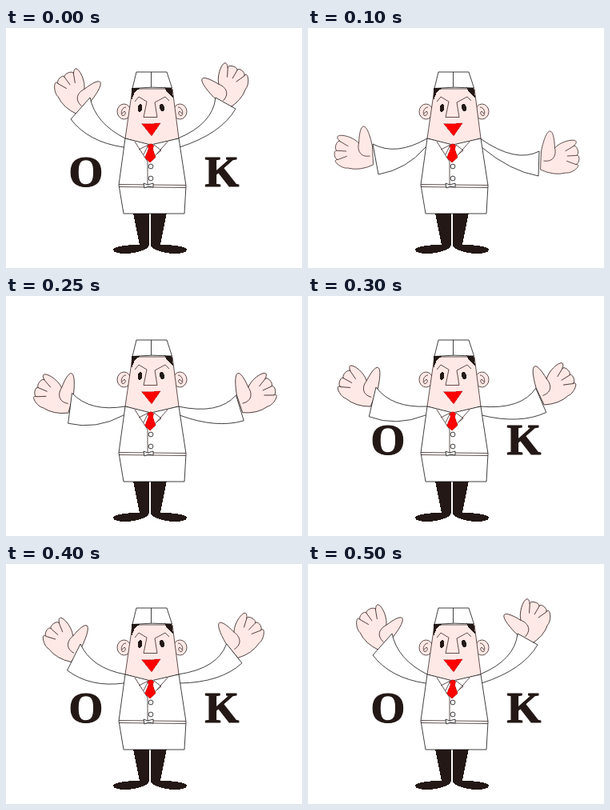
These frames come from a looping animation (370 px wide and 300 px high, 1 s). An HTML page:

```html
<!DOCTYPE html>
<html lang="en">
<head>
<meta charset="utf-8">
<title>OK</title>
<style>
  html, body { margin: 0; width: 100%; height: 100%; overflow: hidden; background: #fff; }
  svg { display: block; width: 370px; height: 300px; }
  text { font: bold 55px "Liberation Serif", "Times New Roman", serif; text-anchor: middle; fill: #231815; stroke: #231815; stroke-width: 1.2; }
  .skin { fill: #ffe9e6; stroke: #3a2424; }
  .cloth { fill: #fff; stroke: #111; }
  .line { fill: none; stroke: #3a2424; }
  .dark { fill: #231815; stroke: none; }
  .red { fill: #f00; stroke: #a01010; stroke-width: .5; }
</style>
</head>
<body>
<svg viewBox="0 0 370 300" stroke-width=".8" stroke-linejoin="round" shape-rendering="crispEdges">
  <defs>
    <path id="shoe" class="dark" d="M159 231H179L178.500 273Q175 278 160 281C149 283 134 282 134 277.500C134 273 150 271 167 271Z"/>
    <g id="ear">
      <ellipse class="skin" cx="147.500" cy="104.500" rx="8.500" ry="9.500"/>
      <path class="line" d="M150 99C145 99 143 106 145 109C148 111 151 106 148 104L145 107"/>
    </g>
  </defs>

  <g id="left"></g>
  <g id="right" transform="matrix(-1 0 0 1 364 0)"></g>

  <use href="#shoe"/>
  <use href="#shoe" transform="matrix(-1 0 0 1 360 0)"/>
  <use href="#ear"/>
  <use href="#ear" transform="matrix(-1 0 0 1 365 0)"/>

  <path class="skin" d="M158 76L149 138L181 147L216 138L208 76Z"/>
  <path class="dark" d="M157 75H168L161 80L157 90ZM198 74H207L209 87L201 80Z"/>
  <path class="cloth" d="M163 55H201L207.500 75Q182 73 158 75.500ZM181.500 55V74"/>
  <path class="line" d="M161 92L166 86L176 92L172 111.500H189L186 93L199 86L204 91"/>
  <ellipse class="dark" cx="167.500" cy="100" rx="2.700" ry="4.800" transform="rotate(8 167.500 100)"/>
  <ellipse class="dark" cx="195" cy="99.500" rx="2.700" ry="4.800" transform="rotate(-8 195 99.500)"/>
  <path class="red" d="M169.500 119.500Q182 120 193 119L182 135Z"/>

  <path class="cloth" d="M149 138L141 196L147 232H223L225 197L216 138L181 146Z"/>
  <path class="line" d="M161 142L177 167V195M202 142L180 167M166 152L178 146L172 158M185 146L194 153L189 157M141 195.500L225 196.500M141 198.500L225 199.500"/>
  <path class="red" d="M177 147L181 144.500L185 147L183.500 151L187 162L180 168L173.500 162L178 151Z"/>
  <circle class="cloth" cx="181" cy="173" r="2.900"/>
  <circle class="cloth" cx="181" cy="188" r="2.900"/>
  <path class="cloth" d="M172 194L177 196L184 194V199L178 198L173 200Z"/>

  <g id="ok"><text x="100" y="197.500">O</text><text x="270" y="197.500">K</text></g>
</svg>
<script>
const STEP = 50, LOW = 2, HIGH = 10, OK_STEP = 6;
const $ = id => document.getElementById(id);
const add = (a, b) => a.map((v, i) => v + b[i]);
const mix = (a, b, k) => a.map((v, i) => v + (b[i] - v) * k);
const curve = ([a, b, c], u) => mix(mix(a, b, u), mix(b, c, u), u);
const polar = (r, deg) => [r * Math.cos(deg * Math.PI / 180), r * Math.sin(deg * Math.PI / 180)];

// Start, control and end of the path of the thumb tip and both cuff corners.
const arms = {
  left: {
    turn: 50,
    tip: [[70, 123], [82, 84], [118, 68]],
    upper: [[81, 145], [77, 112], [105, 87]],
    lower: [[88, 183], [68, 153], [81, 114]]
  },
  right: {
    turn: 56,
    tip: [[62, 129], [72, 80], [119, 64]],
    upper: [[75, 154], [70, 110], [102, 87]],
    lower: [[76, 185], [56, 148], [77, 101]]
  }
};

// A rounded finger between two notches; pinch narrows it.
function finger(from, tip, to, pinch = 0) {
  const mid = mix(from, to, .5), lift = mid.map((v, i) => (tip[i] - v) * 4 / 3);
  const push = p => add(mix(p, mid, pinch), lift);
  return `C${push(from)} ${push(to)} ${to}`;
}

// Hand around its palm centre, with four fingers in a fan.
function makeHand() {
  const web = [3, -16];
  let outline = 'M20-12' + finger([20, -12], [9.5, -37], web, .45);
  let creases = `M${web}C1-8 4 2 17 0`, from = web;
  for (let i = 0; i < 4; i++) {
    const angle = -124 - 26.5 * i, r = 31 - 1.8 * i;
    const to = i < 3 ? polar(r - 4, angle - 14) : [-11, 15];
    outline += finger(from, polar(r, angle), to, -.15);
    if (i < 3) creases += `M${to}L${mix(to, [2, -5], .45)}`;
    from = to;
  }
  return `<path class="skin" d="${outline}Q4 19 21 11Z"/><path class="line" d="${creases}"/>`;
}
const hand = makeHand();

function drawArm(id, u) {
  const arm = arms[id], turn = arm.turn * u;
  const tip = curve(arm.tip, u), upper = curve(arm.upper, u), lower = curve(arm.lower, u);
  const sleeve = `M149 138Q${add(upper, polar(33, turn + 28))} ${upper}` +
    `L${lower}Q${add(lower, polar(36, turn * 1.25 - 10))} 147,149`;
  $(id).innerHTML = `<g transform="translate(${tip}) rotate(${turn}) translate(-9.5 37)">${hand}</g>` +
    `<path class="cloth" d="${sleeve}"/>`;
}

function frame(ms) {
  const n = Math.floor(ms % 1000 / STEP);
  const step = n === 0 ? HIGH : Math.min(n, HIGH);
  const u = (step - LOW) / (HIGH - LOW);
  drawArm('left', u);
  drawArm('right', u);
  $('ok').style.display = step < OK_STEP ? 'none' : '';
}

let start;
function tick(now) {
  start ??= now;
  frame(now - start);
  requestAnimationFrame(tick);
}
frame(0);
requestAnimationFrame(tick);
</script>
</body>
</html>
```
